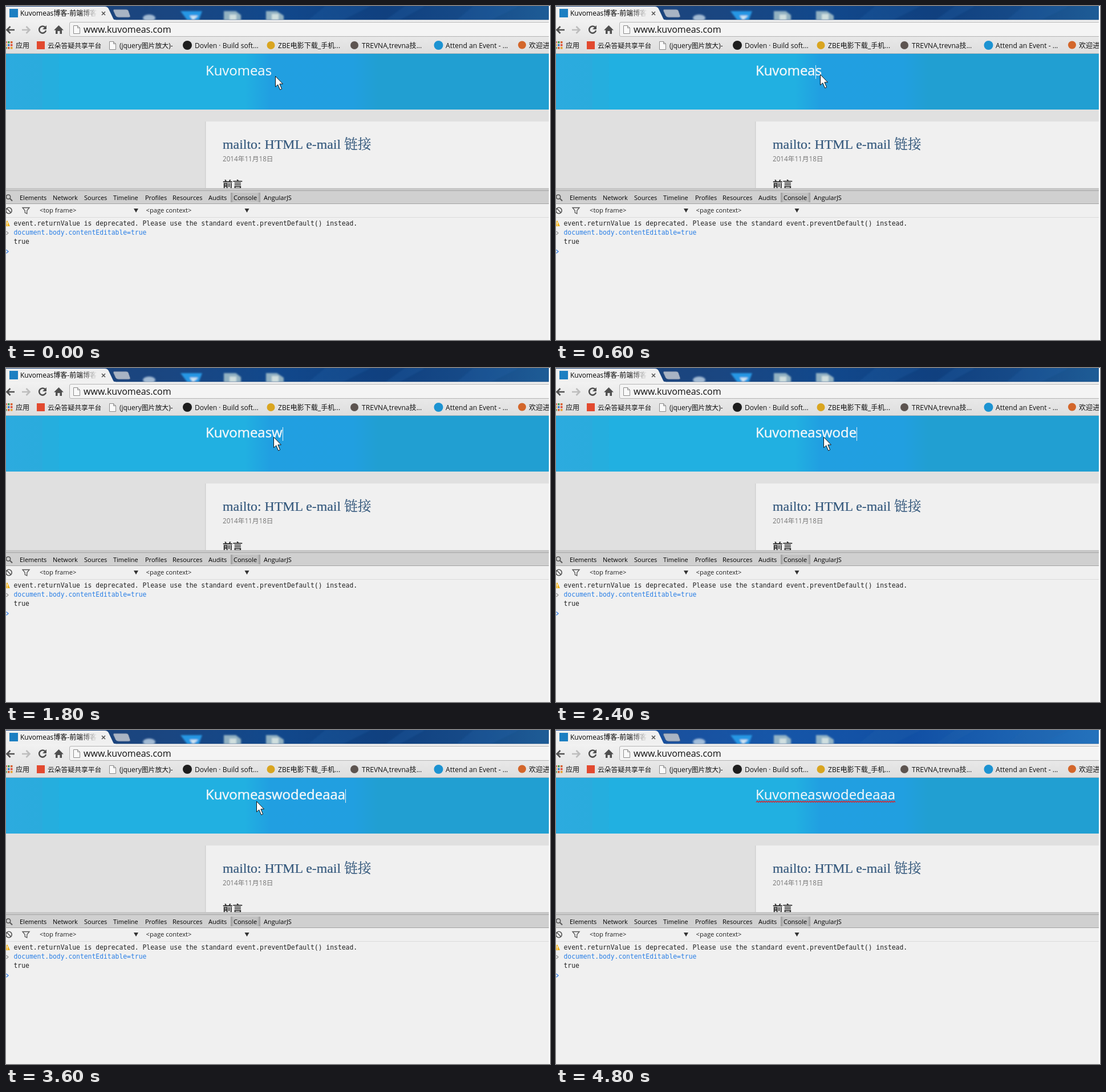
These frames come from a looping animation (954 by 587 pixels, 6000 ms). An HTML page:

```html
<!DOCTYPE html>
<html lang="zh">
<head>
<meta charset="utf-8">
<title>contentEditable</title>
<style>
html, body { margin: 0; width: 100%; height: 100%; overflow: hidden; background: #f0f0f0; }
svg { display: block; width: 954px; height: 587px; }
text { font-family: "Open Sans", "Noto Sans CJK SC", "Noto Sans CJK", sans-serif; white-space: pre; }
.serif { font-family: "Liberation Serif", "Noto Serif CJK SC", "Noto Sans CJK SC", "Noto Sans CJK", serif; }
.mono { font-family: "DejaVu Sans Mono", monospace; font-size: 11.39px; }
.line { fill: none; stroke: #555; }
</style>
</head>
<body>
<svg viewBox="0 0 954 587" xmlns="http://www.w3.org/2000/svg">
  <defs>
    <linearGradient id="sky">
      <stop offset="0" stop-color="#1c4178"/><stop offset=".3" stop-color="#1a4681"/>
      <stop offset=".5" stop-color="#11488c"/><stop offset=".7" stop-color="#10407f"/>
      <stop offset=".85" stop-color="#164a88"/><stop offset="1" stop-color="#1e5c96"/>
    </linearGradient>
    <linearGradient id="skyBright">
      <stop offset="0" stop-color="#1d4a92"/><stop offset=".4" stop-color="#1656a8"/>
      <stop offset=".65" stop-color="#114fa4"/><stop offset="1" stop-color="#2472bc"/>
    </linearGradient>
    <linearGradient id="bar" x2="0" y2="1">
      <stop offset="0" stop-color="#f2f2f2"/><stop offset="1" stop-color="#dedede"/>
    </linearGradient>
    <linearGradient id="banner" gradientUnits="userSpaceOnUse" x1="0" x2="952">
      <stop offset="0" stop-color="#2cabdf"/><stop offset=".066" stop-color="#2aabdd"/>
      <stop offset=".068" stop-color="#25aede"/><stop offset=".097" stop-color="#25aede"/>
      <stop offset=".098" stop-color="#21b0e1"/><stop offset=".44" stop-color="#21b0e1"/>
      <stop offset=".487" stop-color="#219fe1"/><stop offset=".64" stop-color="#219fe0"/>
      <stop offset=".685" stop-color="#219fd2"/><stop offset="1" stop-color="#219fd2"/>
    </linearGradient>
    <linearGradient id="fade">
      <stop offset="0" stop-color="#f0f0f0" stop-opacity="0"/><stop offset="1" stop-color="#f0f0f0"/>
    </linearGradient>
    <linearGradient id="picked">
      <stop offset="0" stop-color="#9a9a9a"/><stop offset=".1" stop-color="#c2c2c2"/>
      <stop offset=".9" stop-color="#c2c2c2"/><stop offset="1" stop-color="#9a9a9a"/>
    </linearGradient>
    <filter id="soft" x="-40%" y="-40%" width="180%" height="180%"><feGaussianBlur stdDeviation="1.6"/></filter>
    <clipPath id="glass"><rect width="952" height="24"/></clipPath>
    <clipPath id="tabClip"><rect x="24" width="136" height="24"/></clipPath>
    <clipPath id="pageClip"><rect y="84" width="952" height="236"/></clipPath>
    <clipPath id="barClip"><rect width="952" height="84"/></clipPath>
  </defs>

  <!-- window glass -->
  <g clip-path="url(#glass)">
    <rect id="desk" width="952" height="25" fill="url(#sky)"/>
    <g filter="url(#soft)">
      <path d="M560 0H640L590 25H530ZM700 0H735L690 25H665ZM820 0H900L850 25H790Z" fill="#2863ad" opacity=".25"/>
      <ellipse cx="251" cy="21" rx="11" ry="6" fill="#c4d7e8" opacity=".8"/>
      <path d="M306 9H344L338 25H318Z" fill="#2697e4"/>
      <path d="M322 17H337L328 25Z" fill="#cfe4f2"/>
      <path d="M382 9H403L412 16V25H382ZM456 9H475L487 17V25H456Z" fill="#a9c3cc" opacity=".85"/>
      <path d="M392 15H404V25H392ZM466 14H478V25H466Z" fill="#e5eee8" opacity=".75"/>
    </g>
  </g>
  <path d="M189 6H211Q214 6 215 9L218 18Q218 20 215 20H197Q194 20 192 17L188 8Z" fill="#a9b4c4" stroke="#46618a"/>

  <!-- browser bars -->
  <rect y="24" width="952" height="60" fill="url(#bar)"/>
  <path d="M0 83.500H952" stroke="#b4b8ba"/>
  <path d="M0 1H173Q178 1 180 5L188 22Q189 25 194 25H0Z" fill="#f0f0f0"/>
  <path d="M192 24.500H952" stroke="#a3b0c0"/>
  <rect x="6" y="5" width="15" height="15" fill="#1c7fc2"/>
  <g id="tabText" clip-path="url(#tabClip)"></g>
  <rect x="130" y="3" width="30" height="20" fill="url(#fade)"/>
  <path d="M168 10l6 6M174 10l-6 6" stroke="#555" stroke-width="1.6"/>
  <path d="M952 28.500H114Q111.500 28.500 111.500 31V51Q111.500 53.500 114 53.500H952" fill="#f4f4f4" stroke="#b4b4b4"/>
  <g fill="none" stroke-width="2.6">
    <path d="M15 42H2M7.500 36L1.500 42L7.500 48" stroke="#505050"/>
    <path d="M28 42H41M35.500 36L41.500 42L35.500 48" stroke="#bdbdbd"/>
    <path d="M69 38A6 6 0 1 0 70 43" stroke="#505050"/>
  </g>
  <path d="M71 34V41H64Z" fill="#505050"/>
  <path d="M92.500 34L101 42.500H98V49H94.500V44H90.500V49H87V42.500H84Z" fill="#505050"/>
  <g id="sheets"></g>
  <g id="apps"></g>
  <rect x="54" y="62" width="14" height="14" fill="#e2492f"/>
  <circle cx="318" cy="69" r="8" fill="#1d1d1d"/>
  <circle cx="464.500" cy="69" r="7" fill="#d9a520"/>
  <circle cx="611" cy="69" r="7" fill="#5d5450"/>
  <circle cx="758.500" cy="69" r="8" fill="#1c93d2"/>
  <circle cx="905" cy="68.500" r="7" fill="#d3662a"/>
  <g id="barText" clip-path="url(#barClip)"></g>

  <!-- page -->
  <g clip-path="url(#pageClip)">
    <rect y="84" width="952" height="98" fill="url(#banner)"/>
    <rect y="182" width="952" height="140" fill="#e0e0e0"/>
    <rect x="349" y="203" width="603" height="120" fill="#d0d0d0"/>
    <rect x="350.500" y="203" width="602" height="120" fill="#f0f0f0"/>
    <g id="pageText"></g>
  </g>
  <text id="heading" x="350" y="122" font-size="23.900" fill="#f2f8fb" stroke="#eaf2f6"></text>
  <path id="squiggle" fill="none" stroke="#d8242e" stroke-width="1.400"/>
  <rect id="caret" y="104" width="1" height="24" fill="#e8f0f4"/>

  <!-- developer tools -->
  <rect y="320" width="952" height="28" fill="#d0d0d0"/>
  <rect y="320" width="952" height="3" fill="#c6c6c6"/>
  <path d="M0 324.500H952M0 347.500H952" stroke="#a2a2a2"/>
  <rect x="394" y="328" width="52" height="17" fill="url(#picked)"/>
  <rect y="348" width="952" height="239" fill="#f0f0f0"/>
  <path d="M0 371.500H952" stroke="#dadada"/>
  <g class="line" stroke-width="1.600">
    <circle cx="4" cy="335.500" r="3.700"/><path d="M7 338.500L11 342.500" stroke-width="2"/>
    <circle cx="5" cy="359.500" r="5.200"/><path d="M1.500 356L8.500 363"/>
    <path d="M29 354.500H41L36.800 359.500V365L33.200 363V359.500Z" stroke-width="1.300"/>
  </g>
  <path d="M224 356H232L228 363ZM418.500 356H426.500L422.500 363Z" fill="#333"/>
  <path d="M2 376.500L7 387H-3Z" fill="#f0b21c"/>
  <path d="M2 380V383.500M2 384.500V386" stroke="#fff" stroke-width="1.500"/>
  <g fill="none" stroke-width="1.400">
    <path d="M.5 396L4 399L.5 402" stroke="#999"/>
    <path d="M.5 428.500L4 431.500L.5 434.500" stroke="#3b82e8"/>
  </g>
  <g id="toolText"></g>

  <path id="pointer" d="M.5.5V19L4.800 15.200L8.600 24.200L11.600 22.800L7.900 14H13.500Z" fill="#fff" stroke="#111"/>
  <rect x="952" width="2" height="587" fill="#fff"/>
</svg>
<script>
const $ = id => document.getElementById(id);
const SITE = "Kuvomeas", TYPED = "wodedeaaa";
const LOOP = 6000, STEP = 200, TYPE_START = 1800;

function add(parent, tag, attrs, content = "") {
  const node = document.createElementNS("http://www.w3.org/2000/svg", tag);
  for (const key in attrs) node.setAttribute(key, attrs[key]);
  node.textContent = content;
  $(parent).append(node);
}
function label(parent, x, y, size, fill, content, extra) {
  add(parent, "text", { x, y, "font-size": size, fill, ...extra }, content);
}

label("tabText", 25, 17, 12, "#000", SITE + "博客-前端博客");
label("barText", 136, 47, 16, "#111", `www.${SITE.toLowerCase()}.com`);
[
  [17, "应用"], [73, "云朵答疑共享平台", 11.8], [199, "(jquery图片放大)-", 11.9],
  [331, "Dovlen · Build soft..."], [477, "ZBE电影下载_手机..."],
  [624, "TREVNA,trevna技..."], [771, "Attend an Event - ..."], [917, "欢迎进入"]
].forEach(([x, s, size = 12.1]) => label("barText", x, 73.5, size, "#111", s));

label("pageText", 380, 251, 23.85, "#34587c", "mailto: HTML e-mail 链接",
  { class: "serif", stroke: "#34587c", "stroke-width": .2 });
label("pageText", 380, 273, 11.7, "#777", "2014年11月18日");
label("pageText", 380, 319.5, 17.5, "#333", "前言", { "font-weight": 700 });

[
  [24, "Elements"], [82, "Network"], [137, "Sources"], [188, "Timeline"], [244, "Profiles"],
  [292, "Resources"], [355, "Audits"], [399, "Console"], [452, "AngularJS"]
].forEach(([x, s]) => label("toolText", x, 341, 11, "#000", s));
label("toolText", 59, 363, 11.2, "#222", "<top frame>");
label("toolText", 245.5, 363, 11.2, "#222", "<page context>");
[
  ["event.returnValue is deprecated. Please use the standard event.preventDefault() instead.", 386, "#222"],
  ["document.body.contentEditable=true", 402, "#2a7fe6"],
  ["true", 418, "#222"]
].forEach(([s, y, fill]) => add("toolText", "text", { x: 13.5, y, fill, class: "mono" }, s));

[[118, 34], [181, 62]].forEach(([x, y]) => add("sheets", "path", {
  d: `M${x + .5} ${y + .5}h7l4 4v10h-11zM${x + 7.5} ${y + .5}v4h4`, fill: "#fafafa", stroke: "#8a8a8a"
}));
const tints = ["#e0503c", "#e8a02c", "#4a9a50", "#3c78d0", "#d8612e"];
for (let i = 0; i < 9; i++) add("apps", "rect", {
  x: -2 + i % 3 * 5, y: 62 + Math.floor(i / 3) * 5, width: 3.5, height: 3.5, fill: tints[i * 2 % 5]
});

// Pointer stops: start time, x, y
const stops = [
  [0, 472, 123], [200, 466, 120], [400, 463, 120], [800, 458, 120],
  [1000, 466, 121], [1200, 469, 121], [3600, 439, 125], [3800, -50, -50]
];
const within = (t, from, to) => t >= from && t < to;
const show = (id, on) => $(id).setAttribute("visibility", on ? "visible" : "hidden");

function wave(from, to) {
  let d = `M${from} 127`;
  for (let x = from + 2, up = true; x <= to; x += 2, up = !up) d += `L${x} ${up ? 125 : 127}`;
  return d;
}

function render(t) {
  const count = Math.max(0, Math.min(TYPED.length, Math.floor((t - TYPE_START) / STEP) + 1));
  const heading = $("heading"), value = SITE + TYPED.slice(0, count);
  if (heading.textContent !== value) heading.textContent = value;
  heading.setAttribute("stroke-width", within(t, 600, 3800) ? .5 : .2);

  const inside = within(t, 600, 1200);
  const length = heading.getSubStringLength(0, value.length - (inside ? 1 : 0));
  $("caret").setAttribute("x", Math.round(350 + length));
  show("caret", inside || within(t, 1400, 1600) || within(t, TYPE_START, 4400));

  const [, x, y] = stops.filter(s => s[0] <= t).pop();
  $("pointer").setAttribute("transform", `translate(${x} ${y})`);

  const checked = t >= 4800;
  show("squiggle", checked);
  if (checked) $("squiggle").setAttribute("d", wave(351, 350 + length));
  $("desk").setAttribute("fill", checked ? "url(#skyBright)" : "url(#sky)");
}

const start = performance.now();
function tick() {
  render((performance.now() - start) % LOOP);
  requestAnimationFrame(tick);
}
tick();
</script>
</body>
</html>
```
